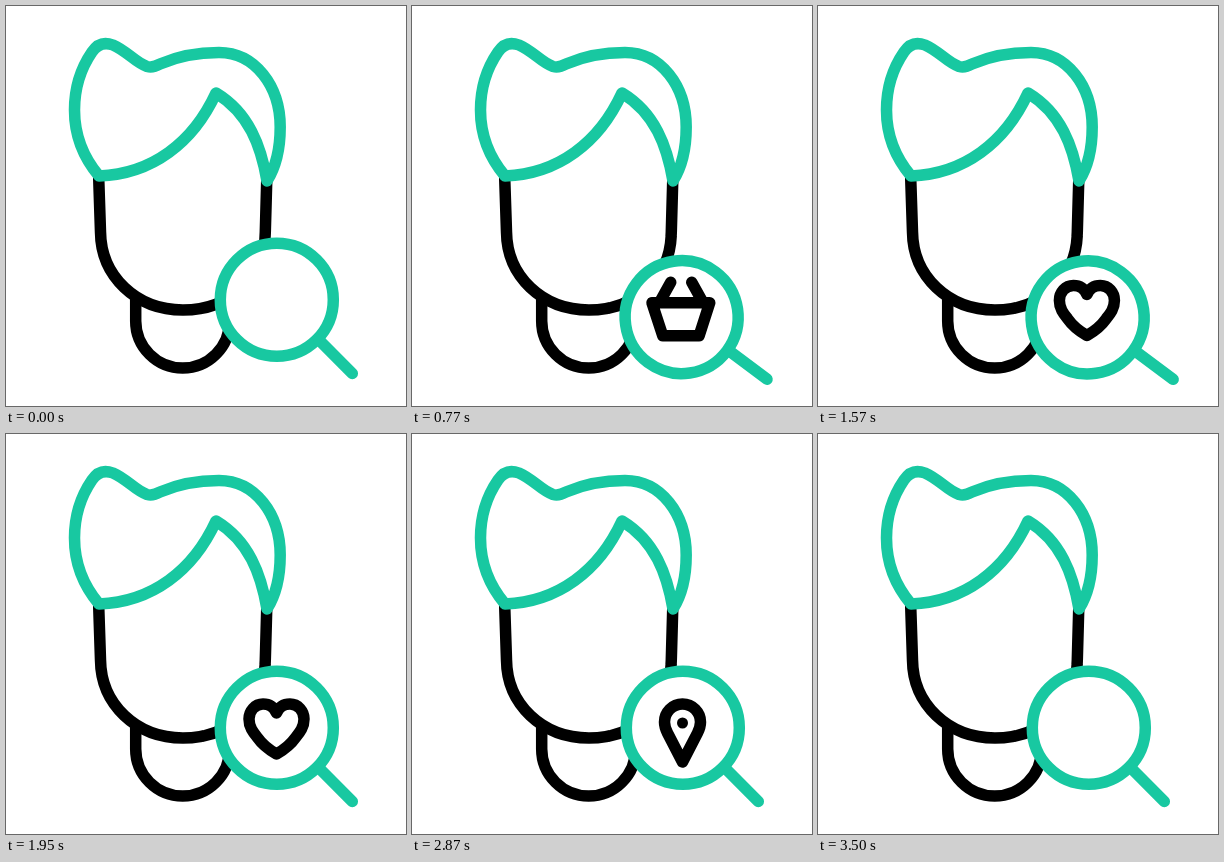
Animation, 400 px wide and 400 px high, one loop 3.52 s. Source, as an HTML page:

```html
<!DOCTYPE html>
<html lang="en">
<head>
<meta charset="utf-8">
<style>
  html, body { margin: 0; width: 100%; height: 100%; overflow: hidden; background: #fff; }
  svg { display: block; width: 100%; height: 100%; fill: none; stroke: #000; stroke-width: 11.5; stroke-linecap: round; stroke-linejoin: round; }
  .teal { stroke: #18c8a1; }
</style>
</head>
<body>
<svg viewBox="0 0 400 400">
  <path d="M129.7 292V315A47 47 0 0 0 223.7 315V292"/>
  <path d="M92.7 172L94.5 226C95 270 130 304 177 304C224 304 259 272 259.3 226L260.7 176"/>
  <path class="teal" d="M93 170C77 151 68.5 129 68.5 104C68.5 82 75 62 86 46Q94 34 107 39C121 45 130 57 141 60.5Q147 62 154 58C170 51 190 46.5 213 46.5C249 46.5 274.2 80 274.2 121C274.2 140 270.5 160 261 175C255 140 243 107 210 87C187 137 146 168 93 170Z"/>
  <g id="lens" class="teal">
    <circle cx="270.8" cy="293.7" r="56.5" fill="#fff"/>
    <path d="M313 334L346.3 367.5"/>
  </g>
  <g id="icons">
    <g>
      <path d="M241.5 287.5H299.3L288.7 320.5H252.3ZM260.3 267L250.3 285M281.3 267L291.3 285"/>
    </g>
    <g>
      <path d="M270.5 320Q258 313 251 303C247 298 243 293 243 285C243 277 249 270 257 270C263 270 268 273 270.5 279C273 273 278 270 284 270C292 270 298 277 298 285C298 293 294 298 290 303Q283 313 270.5 320Z"/>
    </g>
    <g>
      <path d="M270.5 328L255.5 299C253.5 295 252.5 292 252.5 288A18 18 0 0 1 288.5 288C288.5 292 287.5 295 285.5 299Z"/>
      <circle cx="270.5" cy="289" r="5.5" fill="#000" stroke="none"/>
    </g>
  </g>
</svg>
<script>
const LOOP = 3520;
const starts = [520, 1300, 2075, 2870];
const lens = document.getElementById('lens');
const icons = [...document.getElementById('icons').children];

const clamp = x => Math.min(1, Math.max(0, x));
const ease = x => x < .5 ? 4 * x ** 3 : 1 - 4 * (1 - x) ** 3;
const ramp = (t, from, to) => ease(clamp((t - from) / (to - from)));

function draw(now) {
  const t = now % LOOP;
  const step = starts.filter(s => s <= t).length - 1;
  const dt = step < 0 ? LOOP : t - starts[step];

  // Dip down, then settle back
  const swing = ramp(dt, 0, 305) - ramp(dt, 305, 600);
  lens.setAttribute('transform', `rotate(${-8.5 * swing} 390 310.5)`);

  // The old icon shrinks away before the next one grows
  const leaving = dt < 110;
  const shown = leaving ? step - 1 : step;
  const size = leaving ? 1 - ramp(dt, 0, 110) : ramp(dt, 110, 235);
  icons.forEach((icon, i) => {
    icon.style.display = i === shown && size > .01 ? '' : 'none';
    icon.setAttribute('transform',
      `translate(${270.5 - 1.6 * swing} ${294 + 9.5 * swing}) scale(${size}) translate(-270.5 -294)`);
  });
}

const begin = performance.now();
function tick() {
  draw(performance.now() - begin);
  requestAnimationFrame(tick);
}
tick();
</script>
</body>
</html>
```
